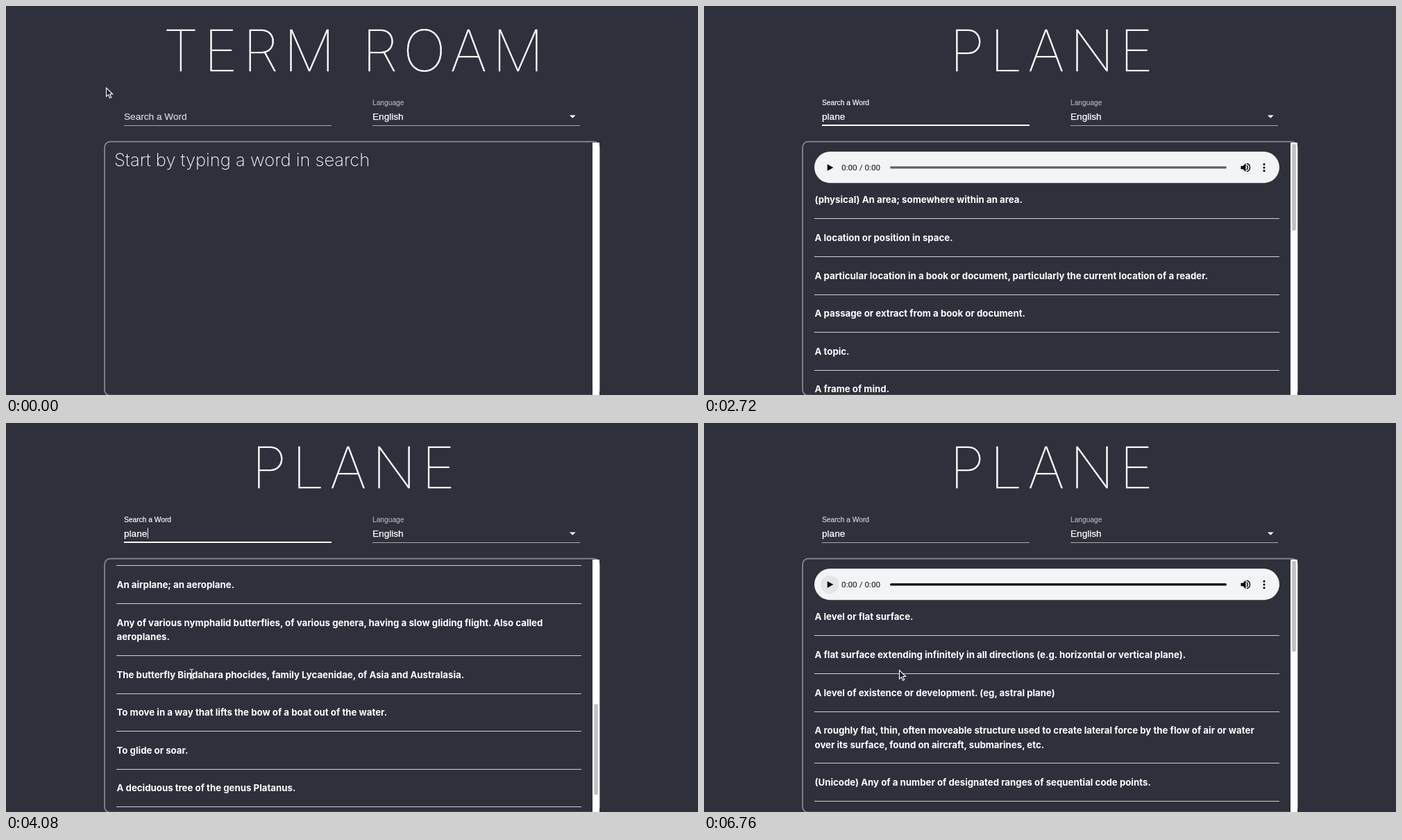
Animation, 997 px wide and 561 px high, one loop 6.92 s. Source, as an HTML page:

```html
<!DOCTYPE html>
<html lang="en">
<head>
<meta charset="utf-8">
<title>Dictionary search</title>
<style>
  html, body { margin: 0; width: 100%; height: 100%; overflow: hidden; background: #2e303b; }
  svg { display: block; width: 100%; height: 100%; }
  text { fill: #fff; }
  .title { font: 100 82.5px Inter, Lato, sans-serif; letter-spacing: 8px; text-anchor: middle; stroke: #fff; stroke-width: .5; }
  .hint { font: 200 25.5px Inter, Lato, sans-serif; }
  .field { font: 13.64px "Liberation Sans", Arial, sans-serif; stroke: currentColor; stroke-width: .25; color: #fff; }
  .small { font: 10.23px "Liberation Sans", Arial, sans-serif; }
  .time { font: 11.8px Roboto, sans-serif; fill: #111; }
  .entry { font: 700 13.25px Inter, sans-serif; }
  .rule { stroke: #d0d1d4; stroke-width: 1.1; }
</style>
</head>
<body>
<svg viewBox="0 0 997 561" xmlns="http://www.w3.org/2000/svg">
  <defs><clipPath id="view"><rect x="143" y="196" width="702" height="365"/></clipPath></defs>
  <rect width="997" height="561" fill="#2e303b"/>
  <text id="title" class="title" x="504.5" y="94"></text>

  <path d="M170 172.5H469M528 172.5H827" stroke="#a9aaaf"/>
  <path id="underline" d="M-149.5 0H149.5" stroke="#fff" stroke-width="2"/>
  <text id="label" class="field">Search a Word</text>
  <text id="typed" class="field" x="170" y="163.5"></text>
  <rect id="caret" y="151.5" width="1" height="15" fill="#fff"/>
  <text class="small" x="528" y="142.5" style="fill:#c3c4c8">Language</text>
  <text class="field" x="528" y="163.5">English</text>
  <path d="M812 157.5h8.6l-4.3 4.3z" fill="#fff"/>

  <rect x="142" y="195.7" width="713" height="366" rx="8" fill="none" stroke="#898b92" stroke-width="1.7"/>
  <g clip-path="url(#view)">
    <text id="hint" class="hint" x="156" y="231">Start by typing a word in search</text>
    <g id="content">
      <rect x="159" y="210" width="670" height="45.3" rx="22.65" fill="#f2f4f6"/>
      <circle id="halo" cx="181" cy="233" r="13" fill="#e3e5e7"/>
      <path d="M177.7 228.2v9.6l8.6-4.8z" fill="#000"/>
      <text class="time" x="198" y="237.2">0:00 / 0:00</text>
      <rect id="slider" x="268" y="231.2" width="485" height="3.4" rx="1.7"/>
      <path d="M773.5 230.7h3l4-4v12.6l-4-4h-3z"/>
      <path d="M782 229.6q2.6 3.4 0 6.8M782 227.3c6 1.2 6 10.2 0 11.4" fill="none" stroke="#000" stroke-width="1.4"/>
      <path d="M807 228.2v0M807 233v0M807 237.8v0" stroke="#000" stroke-width="3" stroke-linecap="round"/>
      <g id="place"></g>
      <g id="plane"></g>
    </g>
  </g>
  <rect x="845" y="197" width="10" height="364" fill="#fff"/>
  <rect id="thumb" x="847.3" width="5.6" rx="2.8" fill="#c1c1c3"/>

  <g id="pointer">
    <path id="arrow" d="M0 0V12.6l2.9-2.7 2.1 4.8 2.2-1-2.1-4.7h4z" fill="#1b1c22" stroke="#fff" stroke-width="1.1"/>
    <path id="beam" d="M-3-6Q0-6 0-4Q0-6 3-6M0-4V6M-3 8Q0 8 0 6Q0 8 3 8M-1.5 2H1.5" fill="none" stroke="#d8d9dc" stroke-width="1.2"/>
  </g>
</svg>
<script>
const LOOP = 6920, STEP = 40, MAX_SCROLL = 622;
const $ = id => document.getElementById(id);
const clamp = v => Math.min(1, Math.max(0, v));
const smooth = u => u * u * (3 - 2 * u);
const show = (id, on) => $(id).setAttribute("visibility", on ? "inherit" : "hidden");
const set = (id, attrs) => Object.entries(attrs).forEach(([k, v]) => $(id).setAttribute(k, v));

const entries = {
  place: [
    "(physical) An area; somewhere within an area.",
    "A location or position in space.",
    "A particular location in a book or document, particularly the current location of a reader.",
    "A passage or extract from a book or document.",
    "A topic.",
    "A frame of mind."
  ],
  plane: [
    "A level or flat surface.",
    "A flat surface extending infinitely in all directions (e.g. horizontal or vertical plane).",
    "A level of existence or development. (eg, astral plane)",
    "A roughly flat, thin, often moveable structure used to create lateral force by the flow of air or water|over its surface, found on aircraft, submarines, etc.",
    "(Unicode) Any of a number of designated ranges of sequential code points.",
    "An imaginary plane which divides the body into two portions.",
    "A tool for smoothing wood by removing thin layers from the surface.",
    "To smooth (wood) with a plane.",
    "To remove or level with a plane.",
    "An airplane; an aeroplane.",
    "Any of various nymphalid butterflies, of various genera, having a slow gliding flight. Also called|aeroplanes.",
    "The butterfly Bindahara phocides, family Lycaenidae, of Asia and Australasia.",
    "To move in a way that lifts the bow of a boat out of the water.",
    "To glide or soar.",
    "A deciduous tree of the genus Platanus.",
    "(Northern UK) A sycamore."
  ]
};

function buildList(id) {
  let y = 284.4, markup = "";
  for (const entry of entries[id]) {
    entry.split("|").forEach((line, i) => {
      if (i) y += 20.3;
      markup += `<text class="entry" x="159.5" y="${y}">${line}</text>`;
    });
    markup += `<path class="rule" d="M159 ${Math.floor(y + 22.4) + 0.5}H829"/>`;
    y += 54.6;
  }
  $(id).innerHTML = markup;
}
Object.keys(entries).forEach(buildList);

// Keys are [time, value, ...]; values between them are interpolated.
function track(keys, t, ease = u => u) {
  const i = keys.findIndex(k => k[0] > t);
  if (i < 0) return keys[keys.length - 1].slice(1);
  if (!i) return keys[0].slice(1);
  const [a, b] = [keys[i - 1], keys[i]];
  const u = ease((t - a[0]) / (b[0] - a[0]));
  return a.slice(1).map((v, j) => v + (b[j + 1] - v) * u);
}

const keystrokes = [1200, 1320, 1440, 1560, 2160];
const pointerPath = [
  [240, 144.5, 118], [640, 215, 157], [2880, 215, 165], [3200, 267.5, 361],
  [5400, 267.5, 361], [5560, 218.5, 250.5], [5720, 180, 232], [5880, 180, 232], [6240, 281.5, 356.5]
];
const scrollPath = [
  [3240, 0], [3400, 61], [3560, 205], [3640, 350], [3720, 470], [3800, 540], [3840, 558],
  [4080, 558], [4200, 596], [4320, 616], [4440, MAX_SCROLL],
  [4960, MAX_SCROLL], [5040, 540], [5200, 240], [5320, 70], [5440, 0]
];
const FOCUS = 640, BLUR = 5800;

function drawField(t, word) {
  const focused = t >= FOCUS && t < BLUR;
  const shrink = smooth(clamp((t - FOCUS) / 120));
  const color = focused ? "#fff" : "#d2d3d6";
  set("label", {
    transform: `translate(170 ${163.5 - 21 * shrink}) scale(${1 - 0.25 * shrink})`,
    style: `fill:${color};color:${color}`
  });
  const open = shrink * (1 - smooth(clamp((t - BLUR) / 120)));
  set("underline", { transform: `translate(319.5 172) scale(${open} 1)` });
  show("underline", open > 0);
  $("typed").textContent = word;
  $("caret").setAttribute("x", 170.5 + (word ? $("typed").getComputedTextLength() : 0));
  const blink = t < 1200 ? t < 1040 : t < 1900 || (t >= 2160 && t < 2720) || Math.floor((t - 2690) / 278) % 2 === 1;
  show("caret", focused && blink);
}

function drawPanel(t, word) {
  const loaded = t >= 1600, plane = t >= 2880;
  const [scroll] = track(scrollPath, t);
  show("hint", !word);
  show("content", loaded);
  show("place", loaded && !plane);
  show("plane", plane);
  show("halo", t >= 5680);
  set("content", { transform: `translate(0 ${-scroll})` });
  set("slider", { fill: t >= BLUR ? "#000" : "#606167" });
  show("thumb", loaded);
  set("thumb", { y: 199 + 230 * scroll / MAX_SCROLL, height: plane ? 131 : 125 });
}

function drawPointer(t) {
  const [x, y] = track(pointerPath, t, smooth);
  const beam = (t >= 560 && t < 1200) || (t >= 3600 && t < 4640);
  set("pointer", { transform: `translate(${x} ${y})` });
  show("pointer", t < 1200 || t >= 2880);
  show("arrow", !beam);
  show("beam", beam);
}

function draw(time) {
  const t = Math.floor(time % LOOP / STEP) * STEP;
  const word = "plane".slice(0, keystrokes.filter(k => t >= k).length);
  $("title").textContent = word.toUpperCase() || "TERM ROAM";
  drawField(t, word);
  drawPanel(t, word);
  drawPointer(t);
}

const start = performance.now();
function tick() {
  draw(performance.now() - start);
  requestAnimationFrame(tick);
}
tick();
</script>
</body>
</html>
```
